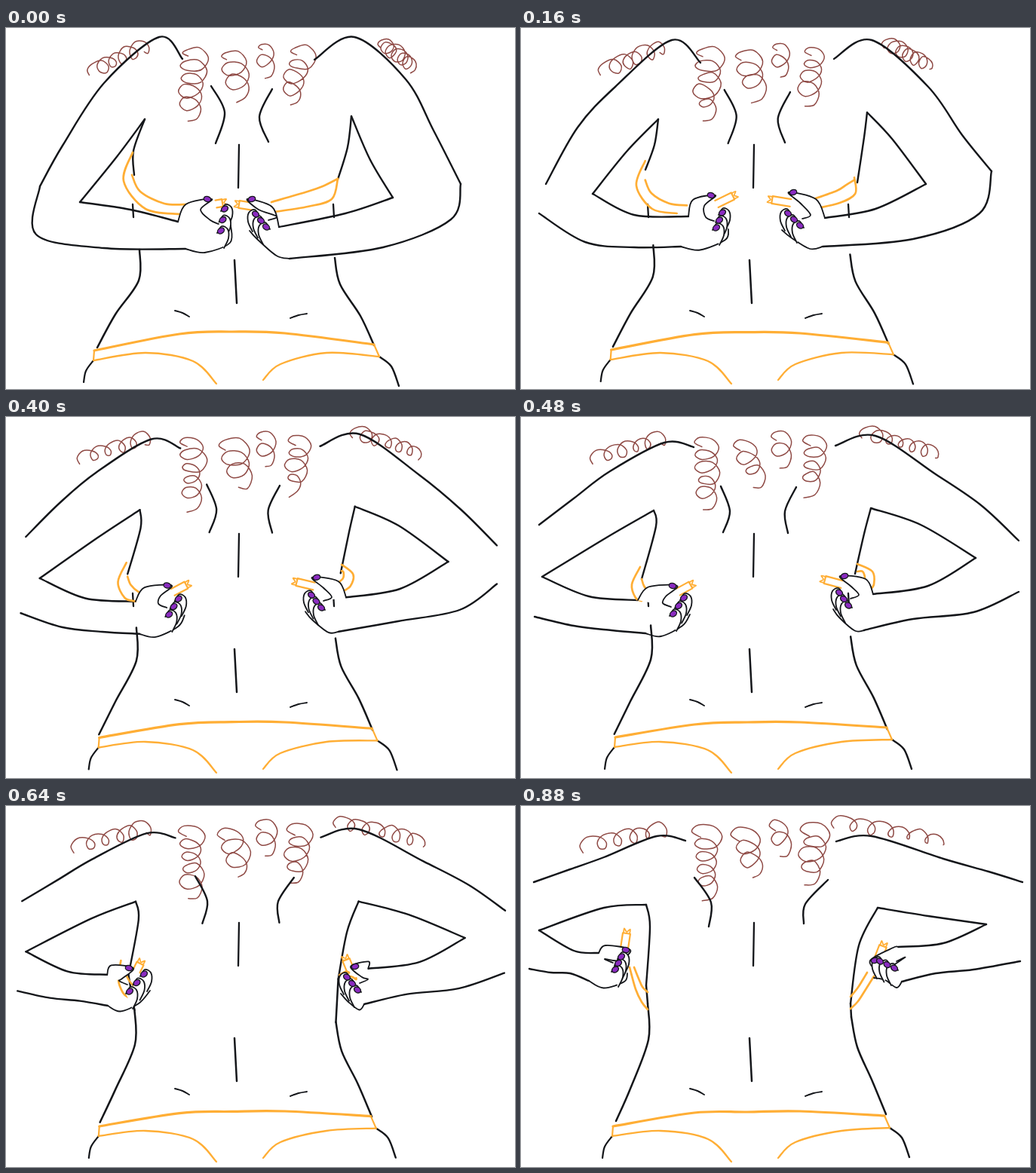
Write an HTML page with a canvas that moves like this. It is 675x479 px and loops after 0.96 s.

```html
<!DOCTYPE html>
<html lang="en">
<head>
<meta charset="utf-8">
<title>Back sketch</title>
<style>
html, body { margin: 0; width: 100%; height: 100%; overflow: hidden; background: #fff; }
canvas { display: block; }
</style>
</head>
<body>
<canvas id="stage" width="675" height="479"></canvas>
<script>
const ctx = document.getElementById('stage').getContext('2d');
const STEP = 80, STEPS = 12;
const INK = '#14161a', GOLD = '#ffae35', HAIR = '#8f4a45', NAIL = '#8a2bc0';

// Steps of the key poses, by how many poses a part has
const KEYS = { 2: [0, 11], 3: [0, 6, 11], 4: [0, 2, 6, 11], 6: [0, 2, 6, 8, 10, 11] };

// One row per key pose: x y x y ...
const poses = s => s.trim().split('\n').map(r => r.trim().split(/\s+/).map(Number));

const armL = poses(`
  234 41 203 12 130 73 75 156 45 210
  238 46 200 16 125 78 75 132 33 207
  229 40 190 34 118 72 70 108 24 143
  218 46 180 40 110 68 65 84 17 101`);
const armR = poses(`
  409 42 462 12 530 68 567 136 603 207
  415 41 465 16 540 78 585 142 624 190
  417 38 470 25 550 76 610 117 660 164
  418 47 465 40 560 70 620 87 665 101`);
const foreL = poses(`
  45 210 40 274 130 292 238 293
  24 246 85 284 150 291 212 290
  18 265 70 277 120 283 165 287
  11 216 40 221 65 222 90 232`);
const foreR = poses(`
  603 207 590 254 500 291 376 306
  624 190 608 246 520 280 400 290
  660 232 600 259 520 268 455 283
  662 206 600 217 550 222 505 233`);

// Ribs, armpit, inner elbow, wrist
const insideL = poses(`
  170 195 169 163 184 121 146 172 98 231 165 241 228 257
  165 188 177 155 182 121 140 164 95 220 150 248 222 250
  160 215 179 145 176 124 115 159 28 212 90 238 155 243
  166 238 171 160 166 131 110 135 24 165 70 192 103 195`);
const insideR = poses(`
  440 201 453 158 458 117 483 175 513 225 450 246 362 264
  446 205 455 145 459 112 492 147 537 207 470 240 403 252
  443 208 455 155 464 121 530 143 603 187 540 224 467 235
  437 262 448 185 473 135 540 146 617 157 560 182 500 187`);

const hipL = poses(`
  177 294 176 335 145 380 121 424
  168 262 169 310 145 375 126 418`);
const hipR = poses(`
  436 305 443 340 470 382 488 421
  438 280 446 320 465 363 484 409`);
const bladeL = poses(`
  272 77 290 112 278 153
  265 92 277 125 268 153
  230 95 252 128 249 160`);
const bladeR = poses(`
  353 81 336 118 348 151
  365 93 350 125 354 154
  407 98 377 130 375 156`);

const waist = poses(`
  117 428 230 406 300 403 370 405 488 420
  125 425 230 408 300 405 370 405 485 412
  122 425 230 407 300 406 370 405 482 411`);
const bandL = poses(`
  168 165 156 203 185 240 230 247
  158 199 147 222 152 240 160 244
  144 214 152 243 160 260 168 270`);
const trimL = poses(`
  167 195 178 217 210 233 241 234
  160 215 163 224 169 232 178 238
  150 214 156 229 161 240 168 247`);
const trimR = poses(`
  352 231 400 217 420 210 440 200
  452 222 456 214 453 205 446 205
  459 221 453 231 446 242 437 253`);
const bandR = poses(`
  440 200 432 227 400 237 356 244
  446 195 466 205 468 222 462 230
  437 269 447 259 458 242 468 226`);

// Thumb nail, first nail, last nail, end of the strap
const gripL = poses(`
  267 227 290 240 285 269 287 232
  252 222 267 245 259 265 281 223
  201 224 216 240 202 261 225 223
  163 215 183 223 164 246 178 209
  147 206 150 216 137 240 142 190
  139 191 133 200 125 217 140 169`);
const gripR = poses(`
  326 227 331 247 345 264 309 234
  361 218 354 246 370 262 333 228
  429 211 422 233 434 250 403 216
  463 213 452 227 466 244 451 204
  467 208 477 218 493 227 474 189
  469 205 476 206 495 215 480 186`);

// Hair: axis of the scribble, turns, radii
const locks = [
  [poses('247 30 246 114'), 5, 18, 12],
  [poses('298 34 312 85'), 3, 18, 13],
  [poses('344 22 347 58'), 2, 13, 11],
  [poses('391 28 381 94'), 4, 17, 12],
  [poses('114 56 186 24 \n 88 52 190 30'), 5, 11, 10],
  [poses('500 20 540 50 \n 420 20 562 46'), 6, 10, 9]
];

function poseAt(rows, step) {
  const keys = KEYS[rows.length];
  if (!keys) return rows[0];
  let i = rows.length - 1;
  while (keys[i] > step) i--;
  if (keys[i] === step) return rows[i];
  const k = (step - keys[i]) / (keys[i + 1] - keys[i]);
  return rows[i].map((v, j) => v + (rows[i + 1][j] - v) * k);
}

// Smooth curve through points, or straight segments when sharp
function line(p, color, width, { sharp = false, fill = false } = {}) {
  const n = p.length / 2;
  const at = i => {
    const j = 2 * Math.max(0, Math.min(n - 1, i));
    return [p[j], p[j + 1]];
  };
  ctx.beginPath();
  ctx.moveTo(p[0], p[1]);
  for (let i = 0; i < n - 1; i++) {
    const [ax, ay] = at(i - 1), [bx, by] = at(i), [cx, cy] = at(i + 1), [dx, dy] = at(i + 2);
    if (sharp) ctx.lineTo(cx, cy);
    else ctx.bezierCurveTo(bx + (cx - ax) / 6, by + (cy - ay) / 6,
      cx - (dx - bx) / 6, cy - (dy - by) / 6, cx, cy);
  }
  if (fill) { ctx.fillStyle = '#fff'; ctx.fill(); }
  ctx.strokeStyle = color;
  ctx.lineWidth = width;
  ctx.stroke();
}

function random(seed) {
  return () => {
    seed = (seed * 16807) % 2147483647;
    return seed / 2147483647;
  };
}

function scribble([x0, y0, x1, y1], turns, rx, ry, seed) {
  const rnd = random(seed), p = [], n = turns * 6;
  let r = 1;
  for (let i = 0; i <= n; i++) {
    if (i % 3 === 0) r = 0.65 + rnd() * 0.6;
    const t = i / n, a = i * Math.PI / 3 + 2;
    p.push(x0 + (x1 - x0) * t + Math.cos(a) * rx * r * (1.1 - 0.4 * t),
      y0 + (y1 - y0) * t + Math.sin(a) * ry * r);
  }
  line(p, HAIR, 1.5);
}

function nail(x, y, tilt) {
  ctx.beginPath();
  ctx.ellipse(x, y, 4.8, 3.6, tilt, 0, Math.PI * 2);
  ctx.fillStyle = NAIL;
  ctx.fill();
  ctx.strokeStyle = INK;
  ctx.lineWidth = 1.3;
  ctx.stroke();
}

// Strap end with its small hook
function tab(x0, y0, x1, y1) {
  const len = Math.hypot(x1 - x0, y1 - y0) || 1;
  const ux = (x1 - x0) / len, uy = (y1 - y0) / len;
  const at = (x, y, along, side) => [x + ux * along - uy * side, y + uy * along + ux * side];
  line([...at(x0, y0, 0, -5), ...at(x1, y1, 0, -5), ...at(x1, y1, 0, 5), ...at(x0, y0, 0, 5)],
    GOLD, 2.2, { sharp: true });
  line([...at(x1, y1, 0, -4), ...at(x1, y1, 6, -4), ...at(x1, y1, 2, 0),
    ...at(x1, y1, 6, 4), ...at(x1, y1, 0, 4)], GOLD, 1.8);
}

// dir is 1 for the left hand, -1 for the right one
function hand(inside, fore, grip, dir) {
  const [tx, ty, ax, ay, cx, cy, ex, ey] = grip;
  const [wx, wy] = inside.slice(-2), [px, py] = fore.slice(-2);
  const nails = [[ax, ay], [(ax + cx) / 2, (ay + cy) / 2], [cx, cy]];

  tab((tx + ax) / 2, (ty + ay) / 2, ex, ey);
  line([wx, wy, (wx + tx) / 2 - 9 * dir, (wy + ty) / 2 - 8, tx + 6 * dir, ty,
    tx - 9 * dir, ty + 14, cx - 14 * dir, cy - 14, cx - 3 * dir, cy - 9],
    INK, 1.8, { fill: true });
  line([px, py, (px + cx) / 2 + 2 * dir, (py + cy) / 2 + 17,
    cx + 12 * dir, cy + 16, ax + 8 * dir, ay + 22], INK, 1.8);
  for (const [x, y] of nails)
    line([x - 5 * dir, y + 3, x + dir, y - 6, x + 9 * dir, y - 2,
      x + 10 * dir, y + 10, x + 4 * dir, y + 23], INK, 1.8, { fill: true });
  nail(tx, ty, 0.25 * dir);
  for (const [x, y] of nails) nail(x, y, -0.6 * dir);
}

function flank(inside, hip, step, x) {
  // Ribs, upper arm and forearm meet in sharp corners
  for (const i of [0, 4, 8]) line(inside.slice(i, i + 6), INK, 2.4);
  line(hip, INK, 2.5);
  if (step < 8) line([x, 234, x + 1, 251], INK, 2.3);
  else line([inside[0], inside[1], hip[0], hip[1]], INK, 2.5);
}

function draw(step) {
  const now = rows => poseAt(rows, step);
  ctx.fillStyle = '#fff';
  ctx.fillRect(0, 0, 675, 479);
  ctx.lineCap = ctx.lineJoin = 'round';

  locks.forEach(([axis, turns, rx, ry], i) =>
    scribble(now(axis), turns, rx, ry, 911 + step * 7717 + i * 3571));

  for (const part of [armL, armR, foreL, foreR, bladeL, bladeR]) line(now(part), INK, 2.4);
  flank(now(insideL), now(hipL), step, 168);
  flank(now(insideR), now(hipR), step, 434);
  line([309, 155, 308, 212], INK, 2.3);
  line([303, 308, 306, 365], INK, 2.5);
  line([224, 375, 234, 378, 243, 383], INK, 1.9);
  line([377, 385, 388, 381, 399, 379], INK, 1.9);

  const top = now(waist);
  const lx = top[0] - 1, ly = top[1] + 13, rx = top[8] + 7, ry = top[9] + 16;
  line([lx, ly, lx - 10, ly + 14, lx - 13, ly + 29], INK, 2.2);
  line([rx, ry, rx + 16, ry + 13, rx + 26, ry + 39], INK, 2.4);
  line(top, GOLD, 3.2);
  line([top[0], top[1], lx, ly], GOLD, 2.2);
  line([top[8], top[9], rx, ry], GOLD, 2.2);
  line([lx, ly, 185, 431, 248, 442, 279, 472], GOLD, 2.3);
  line([rx, ry, 425, 431, 364, 446, 341, 467], GOLD, 2.3);

  for (const part of [bandL, bandR, trimL, trimR]) line(now(part), GOLD, 2.7);
  hand(now(insideL), now(foreL), now(gripL), 1);
  hand(now(insideR), now(foreR), now(gripR), -1);
}

let shown = -1;
function tick() {
  const step = Math.floor(performance.now() / STEP) % STEPS;
  if (step !== shown) draw(shown = step);
  requestAnimationFrame(tick);
}
tick();
</script>
</body>
</html>
```
